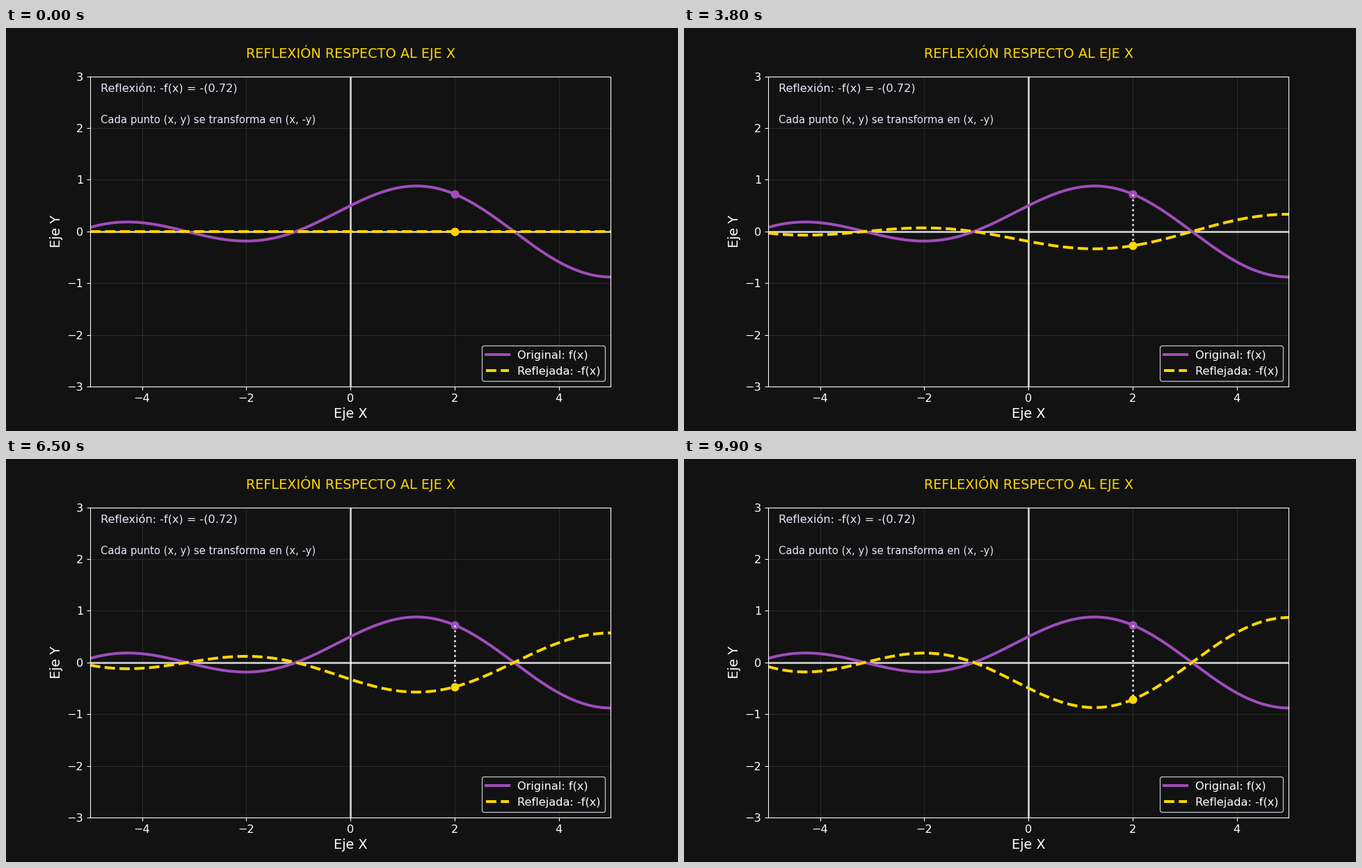
Write a matplotlib script that moves like this. It is 966 px wide and 580 px high and loops after 10000 ms.

```python
import numpy as np
import matplotlib.pyplot as plt
from matplotlib.animation import FuncAnimation

DPI = 96.6
FRAMES, INTERVAL = 100, 100
BG, LAVENDER, GOLD, PURPLE = "#121212", "#E6E6FA", "#FFD700", "#9F4DBB"
X0 = 2.0

plt.rcParams.update({
    "font.family": "DejaVu Sans",
    "font.size": 12,
    "axes.labelsize": "large",
    "axes.titlesize": "large",
    "axes.facecolor": BG,
    "axes.edgecolor": "white",
    "axes.labelcolor": "white",
    "xtick.color": "white",
    "ytick.color": "white",
    "text.color": "white",
})


def f(x):
    return 0.5 * np.sin(x) + 0.5 * np.cos(x / 2)


# The small margin keeps rounding from dropping a pixel.
fig, ax = plt.subplots(figsize=((966 + 1e-6) / DPI, (580 + 1e-6) / DPI),
                       dpi=DPI, facecolor=BG)
ax.set(xlim=(-5, 5), ylim=(-3, 3), xlabel="Eje X", ylabel="Eje Y")
ax.set_title("REFLEXIÓN RESPECTO AL EJE X", color=GOLD, pad=20)
ax.grid(color="white", alpha=0.1, lw=0.8)
ax.axhline(0, color="white", lw=2, alpha=0.8)
ax.axvline(0, color="white", lw=2, alpha=0.8)

x = np.linspace(-5, 5, 500)
y, y0 = f(x), f(X0)

ax.plot(x, y, color=PURPLE, lw=3, label="Original: f(x)")
mirror, = ax.plot(x, 0 * x, "--", color=GOLD, lw=3, label="Reflejada: -f(x)")
ax.plot([X0], [y0], "o", color=PURPLE, ms=8)
link, = ax.plot([], [], ":", color=LAVENDER, lw=2)
dot, = ax.plot([X0], [0], "o", color=GOLD, ms=8)

ax.text(0.02, 0.95, f"Reflexión: -f(x) = -({y0:.2f})",
        transform=ax.transAxes, color=LAVENDER)
ax.text(0.02, 0.85, "Cada punto (x, y) se transforma en (x, -y)",
        transform=ax.transAxes, color=LAVENDER, fontsize=11)
ax.legend(loc="lower right", facecolor=BG, edgecolor=LAVENDER)


def update(i):
    k = -i / FRAMES
    mirror.set_ydata(k * y)
    dot.set_ydata([k * y0])
    if i:
        link.set_data([X0, X0], [y0, k * y0])
    else:
        link.set_data([], [])
    return mirror, link, dot


anim = FuncAnimation(fig, update, frames=FRAMES, interval=INTERVAL,
                     repeat=True, repeat_delay=0)
plt.show()
```
